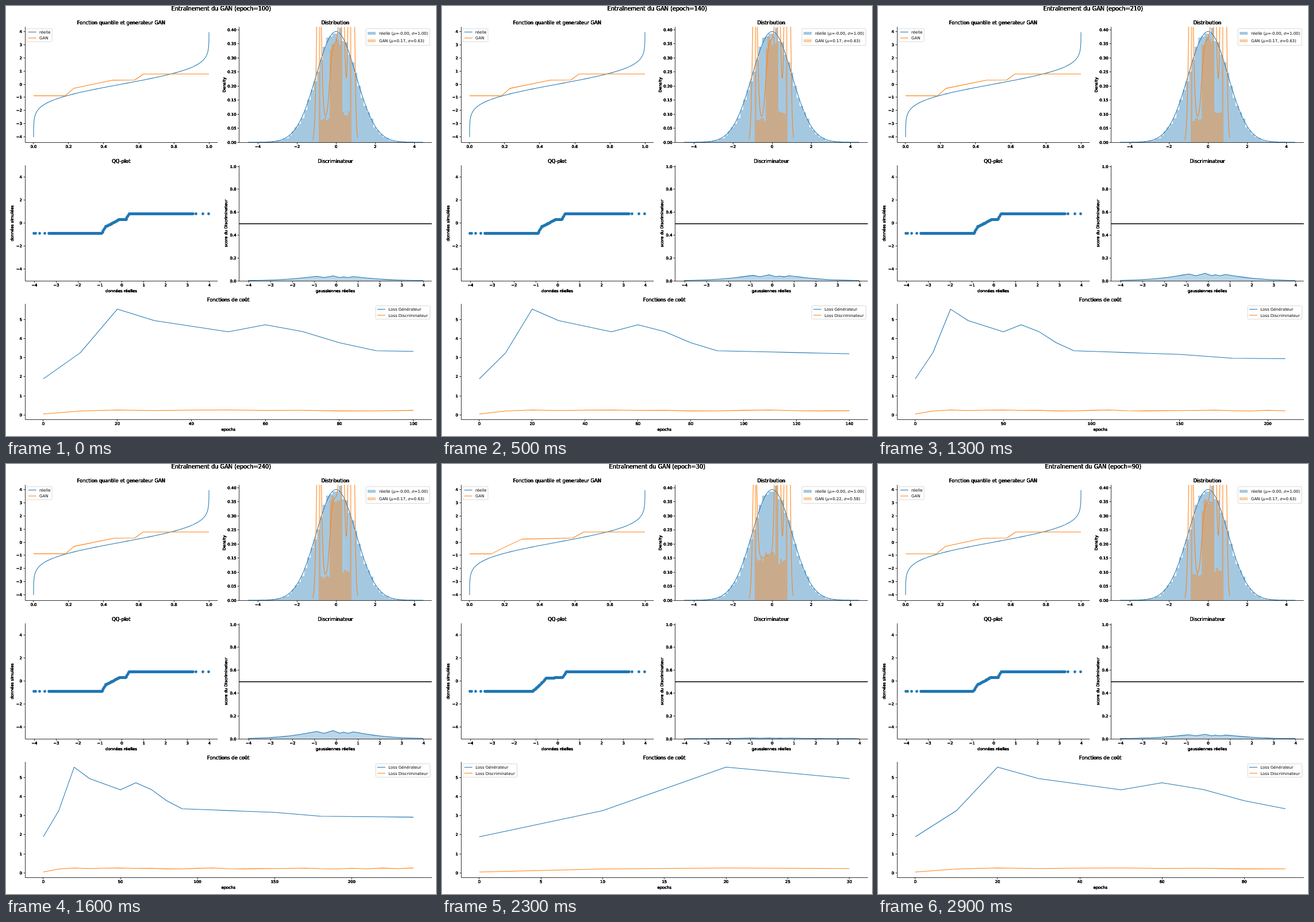
Write an HTML page with a canvas that moves like this. It is 748x748 px and loops after 3000 ms.

```html
<!DOCTYPE html>
<html lang="fr">
<head>
<meta charset="utf-8">
<title>Entraînement du GAN</title>
<style>
html, body { margin: 0; width: 100%; height: 100%; overflow: hidden; background: #fff; }
canvas { display: block; width: 748px; height: 748px; }
</style>
</head>
<body>
<canvas id="stage" width="748" height="748"></canvas>
<script>
const ctx = document.getElementById('stage').getContext('2d');
const BLUE = '#1f77b4', ORANGE = '#ff7f0e', FONT = '"DejaVu Sans", sans-serif';
const STEP = 100, SAMPLES = 10000;

// Epochs play in the alphabetical order of their "<epoch>_" names.
const order = Array.from({ length: 30 }, (_, i) => (i + 1) * 10)
  .sort((a, b) => (a + '_' < b + '_' ? -1 : 1));

// Knots of the generator curve: the early pose and the one it settles into.
const early = [[0, -.89], [.123, -.89], [.211, -.31], [.3, .24], [.589, .32], [.651, .78], [1, .78]];
const settled = [[0, -.88], [.183, -.88], [.23, -.32], [.46, .31], [.577, .32], [.625, .785], [1, .785]];

const scoreCrest = [[-.88, .9], [-.56, .67], [-.14, 1], [.16, .68], [.33, .8], [.54, .66], [.78, .84]];
const lossKeys = [[0, 1.89], [10, 3.26], [20, 5.54], [30, 4.94], [50, 4.35], [60, 4.72], [70, 4.37],
  [80, 3.78], [90, 3.36], [150, 3.17], [180, 2.97], [250, 2.91], [260, 2.71], [300, 2.58]];

const range = (a, b, n) => Array.from({ length: n + 1 }, (_, i) => a + (b - a) * i / n);
const ticks = (a, b, step) => range(a, b, Math.round((b - a) / step));
const bell = z => Math.exp(-z * z / 2) / Math.sqrt(2 * Math.PI);
const mix = (a, b, k) => a + (b - a) * k;

// Height at x of the polyline through the points.
function along(points, x) {
  const i = Math.max(1, points.findIndex(p => p[0] >= x));
  const [a, b] = [points[i - 1], points[i]];
  return mix(a[1], b[1], (x - a[0]) / (b[0] - a[0]));
}

function cdf(z) {
  const t = 1 / (1 + .2316419 * Math.abs(z));
  const tail = bell(z) * t * (.31938153 + t * (-.356563782 + t * (1.781477937 + t * (-1.821255978 + t * 1.330274429))));
  return z > 0 ? 1 - tail : tail;
}

function noise(i, seed) {
  const v = Math.sin(i * 12.9898 + seed * 78.233) * 43758.5453;
  return (v - Math.floor(v)) * 2 - 1;
}

const settling = epoch => 1 - Math.exp(-Math.max(0, epoch - 60) / 14);
const genLoss = epoch => along(lossKeys, epoch);
const discLoss = epoch => epoch ? .235 + .03 * noise(epoch, 1) : .05;

function score(x, epoch) {
  const height = (.026 + .00019 * epoch) * mix(.25, 1, settling(epoch));
  const edge = Math.min(.78, Math.max(-.88, x));
  return height * along(scoreCrest, edge) * Math.exp(-.7 * Math.abs(x - edge) ** 1.2);
}

function plot(left, right, top, bottom, xMin, xMax, yMin, yMax) {
  return {
    left, right, top, bottom,
    x: v => left + (v - xMin) / (xMax - xMin) * (right - left),
    y: v => bottom - (v - yMin) / (yMax - yMin) * (bottom - top)
  };
}

// Outside text is laid down several times, which makes it heavier.
function text(str, x, y, { size = 6.94, align = 'center', turn = 0, passes = 5, style = '' } = {}) {
  ctx.save();
  ctx.translate(x, y);
  ctx.rotate(turn);
  ctx.font = `${style} ${size}px ${FONT}`;
  ctx.textAlign = align;
  ctx.fillStyle = '#000';
  for (let i = 0; i < passes; i++) ctx.fillText(str, 0, 0);
  const width = ctx.measureText(str).width;
  ctx.restore();
  return width;
}

const title = (str, x, p) => text(str, x, Math.round(p.top - 4), { size: 8.33 });
const sideLabel = (str, x, y) => text(str, x, y, { turn: -Math.PI / 2 });

function trace(points) {
  ctx.beginPath();
  points.forEach(([x, y]) => ctx.lineTo(x, y));
}

function line(points, color, width = 1.05) {
  trace(points);
  ctx.strokeStyle = color;
  ctx.lineWidth = width;
  ctx.lineJoin = 'round';
  ctx.stroke();
}

const curve = (p, points, color) => line(points.map(([x, y]) => [p.x(x), p.y(y)]), color);
const snap = v => Math.round(v) + .5;

function axes(p, xs, ys, xDigits = 0, yDigits = 0) {
  const label = (v, d) => (v < 0 ? '\u2212' : '') + Math.abs(v).toFixed(d);
  const left = snap(p.left), bottom = snap(p.bottom);
  line([[left, p.top], [left, bottom], [p.right, bottom]], '#000', .8);
  xs.forEach(v => {
    const x = snap(p.x(v) - .5);
    line([[x, bottom], [x, bottom + 2.9]], '#000', .8);
    text(label(v, xDigits), p.x(v), Math.round(p.bottom + 10.1));
  });
  ys.forEach(v => {
    const y = snap(p.y(v) - .5);
    line([[left, y], [left - 2.9, y]], '#000', .8);
    text(label(v, yDigits), p.left - 4.8, Math.round(p.y(v) + 2.5), { align: 'right' });
  });
}

function frame(x, y, w, h) {
  ctx.beginPath();
  ctx.roundRect(x, y, w, h, 1.4);
  ctx.fillStyle = 'rgba(255,255,255,.8)';
  ctx.fill();
  ctx.strokeStyle = '#ccc';
  ctx.lineWidth = .75;
  ctx.stroke();
}

function lineLegend(x, y, w, h, names) {
  frame(x, y, w, h);
  names.forEach((name, i) => {
    const row = y + 6 + i * 10.4;
    line([[x + 2.8, row], [x + 16.7, row]], i ? ORANGE : BLUE);
    text(name, x + 22.1, Math.round(row + 2.6), { align: 'left', passes: 1 });
  });
}

function bars(p, edges, heights, color) {
  ctx.beginPath();
  heights.forEach((h, i) => {
    const x = Math.round(p.x(edges[i])), y = Math.round(p.y(h));
    ctx.rect(x, y, Math.round(p.x(edges[i + 1])) - x, p.bottom - y);
  });
  ctx.globalAlpha = .4;
  ctx.fillStyle = color;
  ctx.fill();
  ctx.globalAlpha = 1;
}

const sampled = (density, width, i, seed) =>
  Math.max(0, density + noise(i, seed) * Math.sqrt(density / (SAMPLES * width)));

function generator(epoch) {
  const k = settling(epoch);
  const knots = early.map((a, i) => a.map((v, j) => mix(v, settled[i][j], k)));
  const parts = knots.slice(1).map((b, i) => {
    const a = knots[i];
    return { mass: b[0] - a[0], from: a[1], to: Math.max(b[1], a[1] + .002) };
  });
  const moment = f => parts.reduce((sum, s) => sum + s.mass * f(s.from, s.to), 0);
  const mean = moment((a, b) => (a + b) / 2);
  const dev = Math.sqrt(moment((a, b) => (a * a + a * b + b * b) / 3) - mean * mean);
  return { knots, parts, mean, dev, at: q => along(knots, q), low: knots[0][1], high: knots[6][1] + .002 };
}

function drawQuantile(gen) {
  const p = plot(32.7, 368.3, 36.3, 237, -.05, 1.05, -4.43, 4.38);
  title('Fonction quantile et generateur GAN', 200.3, p);
  curve(p, range(-4.03, 3.98, 160).map(v => [cdf(v), v]), BLUE);
  curve(p, gen.knots, ORANGE);
  axes(p, ticks(0, 1, .2), ticks(-4, 4, 1), 1);
  lineLegend(36, 39.3, 44, 22.7, ['réelle', 'GAN']);
}

function drawDistribution(gen, epoch) {
  const p = plot(405.4, 740.7, 36.3, 237, -4.96, 4.89, 0, .41);
  title('Distribution', 572.8, p);
  ctx.save();
  ctx.beginPath();
  ctx.rect(p.left, p.top, p.right - p.left, p.bottom - p.top + 1);
  ctx.clip();

  const realEdges = range(-4.03, 3.97, 50);
  bars(p, realEdges, realEdges.slice(1).map((e, i) => sampled(bell(e - .08), .16, i, 3)), BLUE);
  curve(p, range(-4.5, 4.45, 150).map(v => [v, bell(v / 1.014) / 1.014]), BLUE);

  const binSize = 2 * (gen.at(.75) - gen.at(.25)) / Math.cbrt(SAMPLES);
  const edges = range(gen.low, gen.high, Math.ceil((gen.high - gen.low) / binSize));
  const width = edges[1] - edges[0];
  bars(p, edges, edges.slice(1).map((end, i) => {
    const mass = gen.parts.reduce((sum, s) => {
      const overlap = Math.min(end, s.to) - Math.max(edges[i], s.from);
      return sum + s.mass * Math.max(0, overlap) / (s.to - s.from);
    }, 0);
    return sampled(mass / width, width, i, epoch);
  }), ORANGE);

  const h = gen.dev * Math.pow(SAMPLES, -.2) * 1.04;
  const density = v => gen.parts.reduce((sum, s) =>
    sum + s.mass / (s.to - s.from) * (cdf((v - s.from) / h) - cdf((v - s.to) / h)), 0);
  curve(p, range(gen.low - 3 * h, gen.high + 3 * h, 150).map(v => [v, density(v)]), ORANGE);
  ctx.restore();

  axes(p, ticks(-4, 4, 2), ticks(0, .4, .05), 0, 2);
  sideLabel('Density', 381.5, 137);
  frame(626.2, 39.3, 111, 29.2);
  [['réelle', '-0.00', '1.00', BLUE], ['GAN', gen.mean.toFixed(2), gen.dev.toFixed(2), ORANGE]]
    .forEach(([name, mean, dev, color], i) => {
      const base = 50 + i * 13;
      ctx.globalAlpha = .4;
      ctx.fillStyle = color;
      ctx.fillRect(629, base - 5, 14, 5);
      ctx.globalAlpha = 1;
      let x = 649;
      [`${name} (`, 'μ', `=${mean}, `, 'σ', `=${dev})`].forEach((part, k) => {
        x += text(part, x, base, { align: 'left', passes: 1, style: k % 2 ? 'italic' : '' });
      });
    });
}

function drawQQ(gen) {
  const p = plot(32.7, 368.3, 277.2, 478, -4.435, 4.38, -5, 5);
  title('QQ-plot', 200.3, p);
  ctx.beginPath();
  [-4.03, -3.93, -3.77, -3.51, ...range(-3.34, 3.25, 300), 3.4, 3.7, 3.97].forEach(v => {
    const x = snap(p.x(v) - .5), y = snap(p.y(gen.at(cdf(v))) - .5);
    ctx.moveTo(x, y);
    ctx.arc(x, y, 2.45, 0, 2 * Math.PI);
  });
  ctx.fillStyle = BLUE;
  ctx.fill();
  axes(p, ticks(-4, 4, 1), ticks(-4, 4, 2));
  text('données réelles', 200.5, 498);
  sideLabel('données simulées', 12.8, 378);
}

function drawScore(epoch) {
  const p = plot(405.4, 740.7, 277.2, 478, -4.44, 4.37, 0, 1.01);
  const xs = [...range(-4.03, -1.2, 12), ...scoreCrest.map(c => c[0]), ...range(1, 3.98, 12)];
  const points = xs.map(x => [p.x(x), p.y(score(x, epoch))]);
  title('Discriminateur', 572.8, p);
  trace([[points[0][0], p.bottom], ...points, [points[points.length - 1][0], p.bottom]]);
  ctx.globalAlpha = .3;
  ctx.fillStyle = BLUE;
  ctx.fill();
  ctx.globalAlpha = 1;
  line(points, BLUE);
  line([[p.left, 378.8], [p.right, 378.8]], '#000', 1.4);
  axes(p, ticks(-4, 4, 1), ticks(0, 1, .2), 0, 1);
  text('gaussiennes réelles', 573, 498);
  sideLabel('score du Discriminateur', 384.8, 378);
}

function niceStep(span) {
  const raw = span / 9, unit = 10 ** Math.floor(Math.log10(raw));
  return [1, 2, 2.5, 5, 10].find(m => m * unit >= raw) * unit;
}

function drawLoss(epoch) {
  const epochs = ticks(0, epoch, 10);
  const top = Math.max(...epochs.map(genLoss)), low = discLoss(0);
  const pad = (top - low) * .05;
  const p = plot(32.7, 740.9, 518.2, 718.8, -.05 * epoch, 1.05 * epoch, low - pad, top + pad);
  const xStep = niceStep(1.1 * epoch), yStep = niceStep(22 * pad);
  const upTo = (max, step) => ticks(0, Math.floor(max / step + 1e-6) * step, step);
  title('Fonctions de coût', 386.8, p);
  curve(p, epochs.map(e => [e, genLoss(e)]), BLUE);
  curve(p, epochs.map(e => [e, discLoss(e)]), ORANGE);
  axes(p, upTo(epoch, xStep), upTo(top, yStep), xStep % 1 ? 1 : 0, yStep % 1 ? 1 : 0);
  text('epochs', 386.8, 739);
  lineLegend(epoch <= 30 ? 36.2 : 643.2, 521.5, 94.4, 23.3, ['Loss Générateur', 'Loss Discriminateur']);
}

function draw(epoch) {
  const gen = generator(epoch);
  ctx.fillStyle = '#fff';
  ctx.fillRect(0, 0, 748, 748);
  text(`Entraînement du GAN (epoch=${epoch})`, 374.4, 8, { size: 9.72 });
  drawQuantile(gen);
  drawDistribution(gen, epoch);
  drawQQ(gen);
  drawScore(epoch);
  drawLoss(epoch);
}

const start = performance.now();
let shown = -1;

function tick() {
  const index = Math.floor((performance.now() - start) / STEP) % order.length;
  if (index !== shown) draw(order[shown = index]);
  requestAnimationFrame(tick);
}
tick();
</script>
</body>
</html>
```
